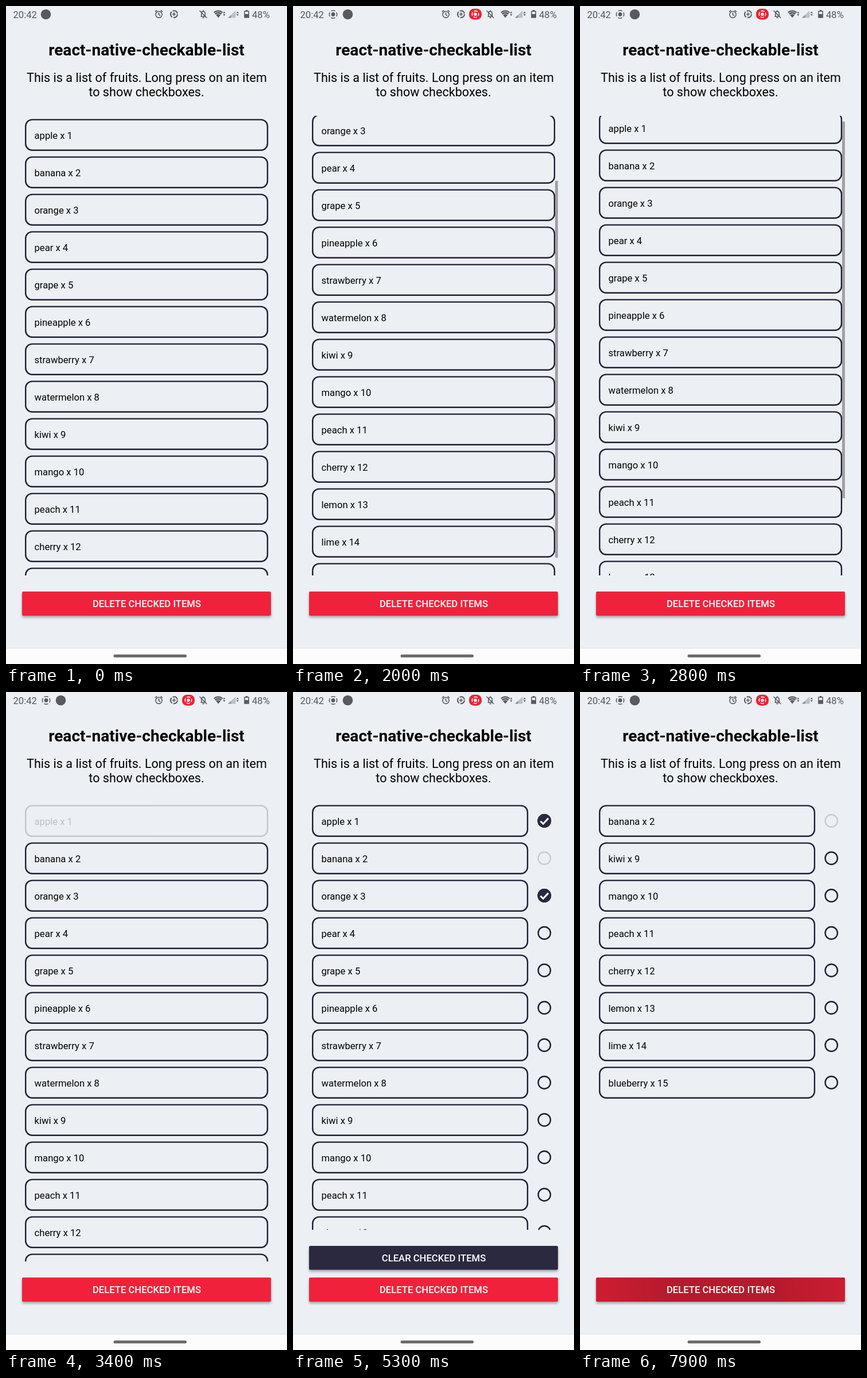
Animation, 490 px wide and 1144 px high, one loop 8 s. Source, as an HTML page:

```html
<!DOCTYPE html>
<html lang="en">
<head>
<meta charset="utf-8">
<title>Checkable list</title>
<style>
  html, body { margin: 0; width: 100%; height: 100%; overflow: hidden; background: #ecf0f5; }
  svg { display: block; }
  text { font-family: Roboto, sans-serif; }
  .item { font-size: 16.65px; }
  .label { font-size: 16.65px; font-weight: 500; fill: #fff; text-anchor: middle; }
  .intro { font-size: 21.6px; text-anchor: middle; }
  .status { font-size: 16.6px; fill: #555558; }
  .button { filter: drop-shadow(0 3px 2px rgba(0, 0, 0, .32)); }
  .line { fill: none; stroke: #5a5a5e; stroke-width: 1.6; }
  .solid { fill: #5a5a5e; }
  .frame { fill: none; stroke: #201e36; stroke-width: 2.4; }
  .tick { fill: none; stroke: #fff; stroke-width: 3; }
</style>
</head>
<body>
<svg width="490" height="1144" viewBox="0 0 490 1144">
  <defs>
    <radialGradient id="rippleFill" gradientUnits="userSpaceOnUse" cx="250" cy="1039" r="250">
      <stop offset="0" stop-opacity=".24"/>
      <stop offset=".35" stop-opacity=".24"/>
      <stop id="rippleEdge" offset="1" stop-opacity=".13"/>
    </radialGradient>
  </defs>
  <rect width="490" height="1144" fill="#ecf0f5"/>

  <text class="status" x="12.5" y="20.5">20:42</text>
  <g id="recording">
    <circle class="solid" cx="70" cy="14.5" r="3.4"/>
    <circle class="line" cx="70" cy="14.5" r="6.7" stroke-dasharray="7.5 3.02" stroke-dashoffset="3.75"/>
  </g>
  <circle id="appDot" class="solid" cy="14.5" r="8.8"/>

  <g class="line">
    <circle cx="266.5" cy="14.8" r="5.6"/>
    <path d="M266.5 11.3v3.8l2.6 1.6M260 10.2l3.4-2.9M273 10.2l-3.4-2.9"/>
    <circle cx="293" cy="14.3" r="6" stroke-width="2" stroke-dasharray="10.5 2.07"/>
    <path d="M293 11.2v6.2M289.9 14.3h6.2"/>
    <path d="M339.5 18.3h9.4M340.8 18v-4.6c0-5.3 6.4-5.3 6.4 0V18M344 7.2v2M342.5 20.4h3M337.5 8l12.8 13"/>
  </g>
  <g id="chip">
    <rect x="-11" y="-9.5" width="22" height="19" rx="8.5" fill="#ea2434"/>
    <circle r="2.8" fill="#fff"/>
    <circle r="5.7" fill="none" stroke="#fff" stroke-width="1.5" stroke-dasharray="6.4 2.55" stroke-dashoffset="3.2"/>
  </g>
  <g class="solid">
    <path d="M362 10.5q8.2-6.6 16.4 0l-8.2 10z"/>
    <path d="M378.3 12.4l2.1-3 2.1 3zM378.3 14.2l2.1 3 2.1-3z"/>
    <path d="M401.7 12.4l2.1-3 2.1 3zM401.7 14.2l2.1 3 2.1-3z"/>
    <path d="M387 20.5L400.5 8v12.5z" opacity=".32"/>
    <path d="M387 20.5l5.5-5v5z" opacity=".5"/>
    <path fill-rule="evenodd" d="M417.8 7h3.6v1.4h2.6v12.4h-8.8V8.4h2.6zM416.8 10v4h5.6v-4z"/>
  </g>
  <path d="M363.5 12.4q6.7-4.8 13.4 0M365.7 15q4.5-3 9 0" fill="none" stroke="#ecf0f5" stroke-width=".9"/>
  <text class="status" x="429" y="20.5">48%</text>

  <text x="245" y="86" text-anchor="middle" font-size="28.1" font-weight="700">react-native-checkable-list</text>
  <text class="intro" x="245.5" y="131.5">This is a list of fruits. Long press on an item</text>
  <text class="intro" x="245" y="157">to show checkboxes.</text>

  <svg id="list" y="191" width="490" height="799"></svg>
  <rect id="bar" x="457" width="5" height="655" fill="#a1a1a5"/>

  <g id="clear">
    <rect class="button" x="28" y="963" width="434" height="41.5" rx="2" fill="#2b2940"/>
    <text class="label" x="245.5" y="990">CLEAR CHECKED ITEMS</text>
  </g>
  <rect class="button" x="28" y="1018" width="434" height="42" rx="2" fill="#f0223b"/>
  <rect id="ripple" x="28" y="1018" width="434" height="42" rx="2" fill="url(#rippleFill)"/>
  <text class="label" x="245.5" y="1045.4">DELETE CHECKED ITEMS</text>

  <rect y="1116" width="490" height="28" fill="#fcfcfd"/>
  <rect y="1116" width="490" height="1" fill="#dfe1e5"/>
  <rect x="187.5" y="1127.5" width="127.5" height="5" rx="2.5" fill="#68686b"/>
</svg>

<script>
const LOOP = 8000, STEP = 100, PITCH = 65, TOP = 191;
const FRUITS = ['apple', 'banana', 'orange', 'pear', 'grape', 'pineapple', 'strawberry',
  'watermelon', 'kiwi', 'mango', 'peach', 'cherry', 'lemon', 'lime', 'blueberry'];
const DISABLED = 1;
const SELECT_AT = 38, DELETE_AT = 79, RIPPLE_AT = 77;
const LONG_TAP = [.6, .3, .7], SHORT_TAP = [.3, .7];

// All times below are counted in steps.
const presses = [
  { row: 8, at: 16, fade: [.8, .9] },
  { row: 0, at: 32, fade: [.8, .35, .2, .2, .2, .2, .45, .8] },
  { row: 0, at: 46, fade: LONG_TAP, checks: true },
  { row: 2, at: 51, fade: SHORT_TAP, checks: true },
  { row: 3, at: 54, fade: SHORT_TAP, checks: true },
  { row: 4, at: 57, fade: SHORT_TAP, checks: true },
  { row: 5, at: 60, fade: LONG_TAP, checks: true },
  { row: 6, at: 64, fade: LONG_TAP, checks: true },
  { row: 7, at: 69, fade: LONG_TAP, checks: true }
];
const scrolls = [
  { at: 16, values: [125.5, 170, 176, 168, 138, 102, 70, 49.5] },
  { at: 27, values: [29, 12, 3, 0] }
];

const $ = id => document.getElementById(id);
const set = (node, attrs) => {
  for (const key in attrs) node.setAttribute(key, attrs[key]);
};
const show = (node, visible) => { node.style.display = visible ? '' : 'none'; };

$('list').innerHTML = FRUITS.map((name, i) => `
  <g class="row">
    <g class="box">
      <rect class="frame" x="34.2" y="6.6" height="53.2" rx="11.5"/>
      <text class="item" x="49.5" y="40">${name} x ${i + 1}</text>
    </g>
    <g class="check" opacity="${i === DISABLED ? .17 : 1}">
      <circle class="frame" cx="438.3" cy="33" r="10.7"/>
      <g class="mark">
        <circle cx="438.3" cy="33" r="11.9" fill="#2b2940"/>
        <path class="tick" d="M431.5 33.6l4.7 4.6 9-9.6"/>
      </g>
    </g>
  </g>`).join('');

const rows = [...document.querySelectorAll('.row')].map(node => ({
  node,
  box: node.querySelector('.box'),
  rect: node.querySelector('rect'),
  check: node.querySelector('.check'),
  mark: node.querySelector('.mark')
}));

function scrollAt(n) {
  const past = scrolls.filter(s => n >= s.at).pop();
  return past ? past.values[Math.min(n - past.at, past.values.length - 1)] : 0;
}

function barOpacity(n) {
  if (n < 16 || n >= 34) return 0;
  return n < 32 ? 1 : n === 32 ? .65 : .25;
}

function boxOpacity(row, n) {
  const press = presses.find(p => p.row === row && n >= p.at && n < p.at + p.fade.length);
  return press ? press.fade[n - press.at] : 1;
}

const isChecked = (row, n) =>
  presses.some(p => p.checks && p.row === row && n >= p.at + p.fade.length - 1);

function drawStatus(n) {
  const k = Math.min(n / 6, 1), eased = 1 - (1 - k) ** 2;
  set($('appDot'), { cx: 69.5 + 26 * eased });
  set($('recording'), { opacity: eased });
  set($('chip'), { transform: `translate(318 14.2) scale(${eased})` });
}

function drawList(n) {
  const scroll = scrollAt(n), selecting = n >= SELECT_AT, deleted = n >= DELETE_AT;
  let slot = 0, anyChecked = false;
  rows.forEach((row, i) => {
    const checked = isChecked(i, n), visible = !(deleted && checked);
    show(row.node, visible);
    if (!visible) return;
    anyChecked = anyChecked || checked;
    set(row.node, { transform: `translate(0 ${slot++ * PITCH - scroll})` });
    set(row.box, { opacity: boxOpacity(i, n) });
    set(row.rect, { width: selecting ? 374.8 : 421.8 });
    show(row.check, selecting);
    show(row.mark, checked);
  });
  set($('list'), { height: anyChecked ? 744 : 799 });
  show($('clear'), anyChecked);
  set($('bar'), { y: TOP + scroll * 799 / 975, opacity: barOpacity(n) });
}

function drawRipple(n) {
  const age = n - RIPPLE_AT;
  show($('ripple'), age >= 0);
  set($('rippleFill'), { r: 80 + 85 * Math.max(age, 0) });
  set($('rippleEdge'), { 'stop-opacity': .05 + .04 * Math.max(age, 0) });
}

let drawn = -1;
function tick() {
  const n = Math.floor(performance.now() % LOOP / STEP);
  if (n !== drawn) {
    drawn = n;
    drawStatus(n);
    drawList(n);
    drawRipple(n);
  }
  requestAnimationFrame(tick);
}
tick();
</script>
</body>
</html>
```
